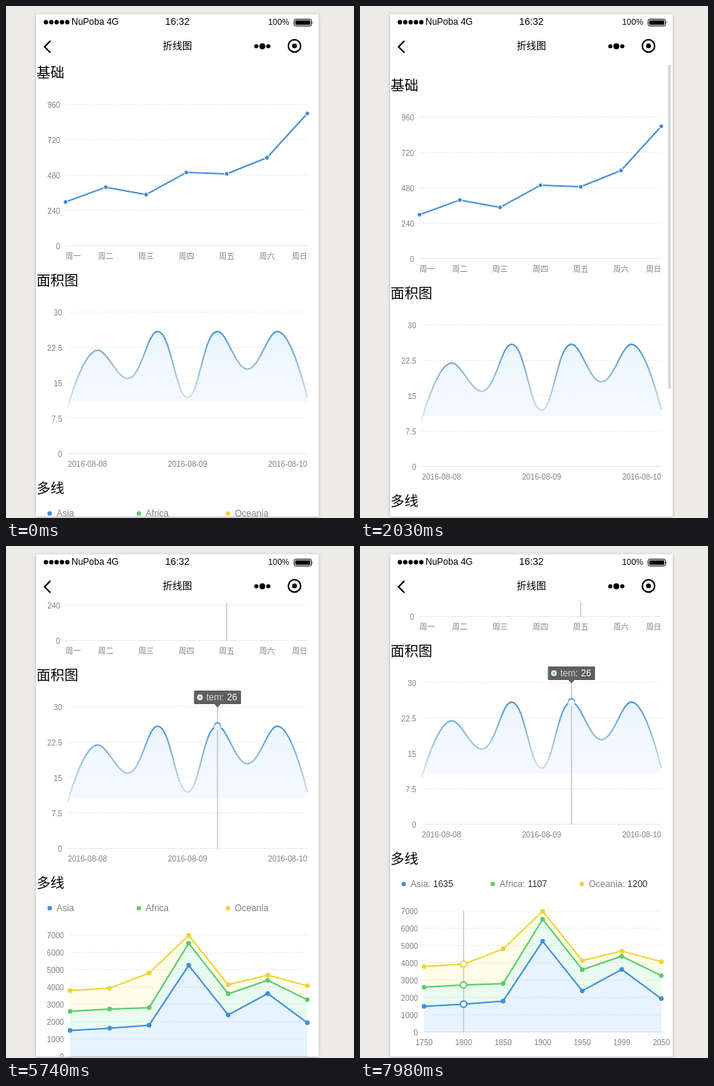
Recreate the animation shown at these times as an HTML page. Size 462 by 680 pixels, loop 8 s.

```html
<!DOCTYPE html>
<html lang="zh">
<head>
<meta charset="utf-8">
<title>折线图</title>
<style>
  html, body { margin: 0; width: 100%; height: 100%; overflow: hidden; background: #ecebe7; }
  #stage { display: block; position: absolute; left: 0; top: 0; }
  text { font-family: "Liberation Sans", "Noto Sans CJK SC", "Noto Sans CJK", "Noto Sans CJK JP", sans-serif; }
  .phone { fill: #fff; filter: drop-shadow(0 1px 2px rgba(0, 0, 0, .22)); }
  .head { font-size: 18.5px; }
  .axis { font-size: 10.2px; fill: #808080; }
  .legend { font-size: 12px; fill: #808080; }
  .legend .val { fill: #333; }
  .tip { font-size: 12px; fill: #fff; }
  .grid { stroke: #e6e6e6; stroke-dasharray: 2; }
  .base { stroke: #e8e8e8; }
  .cross { stroke: #c4c4c4; stroke-width: 1.4; }
  .line { fill: none; stroke-width: 2; stroke-linejoin: round; }
  .box { fill: #5f5f5f; }

  #page { animation: scroll 8s infinite; }
  #bar { fill: #d6d6d6; animation: barMove 8s infinite, barFade 8s linear infinite; }
  .step { opacity: 0; animation: 8s step-end infinite; }
  .thu { animation-name: thu; }
  .fri { animation-name: fri; }
  .tem { animation-name: tem; }
  .plain { animation-name: plain; }
  .pickA { animation-name: pickA; }
  .pickB { animation-name: pickB; }

  @keyframes scroll {
    0%, 10.5% { transform: translateY(0); animation-timing-function: ease-in-out; }
    14% { transform: translateY(-234px); animation-timing-function: ease-out; }
    14.875% { transform: translateY(-240px); animation-timing-function: ease-in-out; }
    20.5%, 21.2% { transform: translateY(-225px); animation-timing-function: ease-in-out; }
    24.5% { transform: translateY(13px); animation-timing-function: ease-out; }
    25.375% { transform: translateY(17px); animation-timing-function: ease-in-out; }
    31.25%, 51% { transform: translateY(0); animation-timing-function: ease-in-out; }
    60.5%, 72.2% { transform: translateY(-193px); animation-timing-function: ease-in-out; }
    76.5% { transform: translateY(-238px); animation-timing-function: ease-out; }
    81.375% { transform: translateY(-226px); }
    83.5%, 100% { transform: translateY(-225px); }
  }
  @keyframes barMove {
    0%, 10.5% { transform: translateY(0); animation-timing-function: ease-in-out; }
    13.8%, 21.2% { transform: translateY(161px); animation-timing-function: ease-in-out; }
    24.3%, 51% { transform: translateY(0); animation-timing-function: ease-in-out; }
    60.5%, 72.2% { transform: translateY(138px); animation-timing-function: ease-in-out; }
    75.5%, 100% { transform: translateY(161px); }
  }
  @keyframes barFade {
    0%, 10.5%, 31.5%, 51%, 67%, 72.2%, 82.5%, 100% { opacity: 0; }
    11.3%, 28.5%, 52%, 62%, 73%, 79.5% { opacity: 1; }
  }
  @keyframes thu { 0% { opacity: 0; } 39.375% { opacity: 1; } 51.625%, 100% { opacity: 0; } }
  @keyframes fri { 0% { opacity: 0; } 51.625%, 100% { opacity: 1; } }
  @keyframes tem { 0% { opacity: 0; } 65.625%, 100% { opacity: 1; } }
  @keyframes plain { 0% { opacity: 1; } 86.625%, 100% { opacity: 0; } }
  @keyframes pickA { 0% { opacity: 0; } 86.625% { opacity: 1; } 94.5%, 100% { opacity: 0; } }
  @keyframes pickB { 0% { opacity: 0; } 94.5%, 100% { opacity: 1; } }
</style>
</head>
<body>
<svg id="stage" width="462" height="680" viewBox="0 0 462 680">
  <defs>
    <linearGradient id="wave" gradientUnits="userSpaceOnUse" x1="0" y1="432" x2="0" y2="532">
      <stop stop-color="#4a91d0"/>
      <stop offset=".5" stop-color="#98bfe0"/>
      <stop offset="1" stop-color="#e2e6ec"/>
    </linearGradient>
    <linearGradient id="under" gradientUnits="userSpaceOnUse" x1="0" y1="432" x2="0" y2="527">
      <stop stop-color="#e7f4fe"/>
      <stop offset=".42" stop-color="#f1f8ff"/>
      <stop offset="1" stop-color="#f3f9ff"/>
    </linearGradient>
    <linearGradient id="ring" x1="0" y1="0" x2="0" y2="1">
      <stop stop-color="#3f8ccf"/>
      <stop offset=".7" stop-color="#cfe4f6"/>
      <stop offset="1" stop-color="#e8f2fb"/>
    </linearGradient>
  </defs>

  <rect class="phone" x="40" y="11" width="375" height="667"/>

  <svg x="40" y="75" width="375" height="603" viewBox="40 75 375 603">
    <g id="page"></g>
    <rect id="bar" x="409" y="78" width="3.5" height="430"/>
  </svg>

  <g id="dots"></g>
  <text x="87" y="25" font-size="12">NuPoba 4G</text>
  <text x="227.5" y="25.3" font-size="13" text-anchor="middle">16:32</text>
  <text x="348" y="25" font-size="11">100%</text>
  <rect x="382.5" y="17.5" width="23" height="9" rx="2" fill="none" stroke="#000"/>
  <rect x="384" y="19" width="20" height="6" rx=".8"/>
  <path d="M406.8 20.2q1.6 1.8 0 3.6z"/>
  <path d="M59 46.3l-7.8 7.9 7.8 7.9" fill="none" stroke="#000" stroke-width="2"/>
  <text x="227.5" y="57" font-size="13" text-anchor="middle">折线图</text>
  <circle cx="332.3" cy="53.5" r="2.8"/>
  <circle cx="340.3" cy="53.5" r="3.9"/>
  <circle cx="348.2" cy="53.5" r="2.8"/>
  <circle cx="383" cy="53" r="8.2" fill="none" stroke="#000" stroke-width="2"/>
  <circle cx="383" cy="53" r="3.2"/>
</svg>
<script>
const NS = 'http://www.w3.org/2000/svg';
const page = document.getElementById('page');

function add(parent, tag, attrs, text) {
  const el = document.createElementNS(NS, tag);
  for (const key in attrs) el.setAttribute(key, attrs[key]);
  if (text !== undefined) el.textContent = text;
  parent.appendChild(el);
  return el;
}
const label = (parent, cls, x, y, text, anchor = 'start') =>
  add(parent, 'text', { class: cls, x, y, 'text-anchor': anchor }, text);
const hline = (cls, x, y) => add(page, 'line', { class: cls, x1: x, x2: 400, y1: y, y2: y });
const vline = (parent, x, y1, y2) => add(parent, 'line', { class: 'cross', x1: x, x2: x, y1, y2 });
const ring = (parent, [cx, cy], stroke, r = 4.2) =>
  add(parent, 'circle', { cx, cy, r, fill: '#fff', stroke, 'stroke-width': 2 });
const stepGroup = name => add(page, 'g', { class: 'step ' + name });
const spread = (values, left, yOf) =>
  values.map((v, i) => [left + (400 - left) * i / (values.length - 1), yOf(v)]);
const poly = pts => 'M' + pts.map(p => p.join(' ')).join('L');

function yAxis(ticks, left, right, yOf) {
  ticks.forEach((v, i) => {
    label(page, 'axis', right, yOf(v) + 3.7, v, 'end');
    hline(i ? 'grid' : 'base', left, Math.round(yOf(v)) - .5);
  });
}

function bubble(parent, x, top, width) {
  add(parent, 'rect', { class: 'box', x: x - width / 2, y: top, width, height: 18, rx: 1 });
  add(parent, 'path', { class: 'box', d: `M${x - 4} ${top + 18}h8l-4 4.5z` });
}

// Curve with flat tangents at each inner turning point
function smooth(pts) {
  const dist = (a, b) => Math.hypot(a[0] - b[0], a[1] - b[1]);
  const handles = pts.map((p, i) => {
    const prev = pts[i - 1], next = pts[i + 1];
    if (!prev || !next) return [0, 0];
    const a = dist(prev, p), b = dist(p, next), span = .4 * (next[0] - prev[0]);
    return [span * a / (a + b), span * b / (a + b)];
  });
  return pts.slice(1).reduce((d, p, i) => {
    const q = pts[i];
    return d + `C${q[0] + handles[i][1]} ${q[1]} ${p[0] - handles[i + 1][0]} ${p[1]} ${p}`;
  }, 'M' + pts[0]);
}

function basicChart() {
  const days = ['周一', '周二', '周三', '周四', '周五', '周六', '周日'];
  const data = [300, 400, 350, 500, 490, 600, 900];
  const yOf = v => 319 - v * 188 / 960;
  const pts = spread(data, 79, yOf);
  label(page, 'head', 40.5, 95, '基础');
  yAxis([0, 240, 480, 720, 960], 79, 72, yOf);
  days.forEach((day, i) =>
    label(page, 'axis', pts[i][0], 336, day, i === 0 ? 'start' : i === 6 ? 'end' : 'middle'));
  const under = add(page, 'g', {});
  add(page, 'path', { class: 'line', d: poly(pts), stroke: '#4a90cf' });
  pts.forEach(([cx, cy]) =>
    add(page, 'circle', { cx, cy, r: 3, fill: '#3f88cc', stroke: '#fff' }));
  [['thu', 3], ['fri', 4]].forEach(([name, i]) => {
    const x = pts[i][0];
    vline(add(under, 'g', { class: 'step ' + name }), x, 127, 319);
    const g = stepGroup(name);
    ring(g, pts[i], '#3f8ccf');
    bubble(g, x, 109, 41);
    label(g, 'tip', x, 122.3, '$ ' + data[i], 'middle');
  });
}

function areaChart() {
  const yOf = v => 595 - v * 6.26;
  const pts = spread([10, 22, 16, 26, 12, 26, 18, 26, 12], 82, yOf);
  const curve = smooth(pts);
  label(page, 'head', 40.5, 371, '面积图');
  yAxis([0, 7.5, 15, 22.5, 30], 82, 74.7, yOf);
  label(page, 'axis', 82, 612, '2016-08-08');
  label(page, 'axis', 241, 612, '2016-08-09', 'middle');
  label(page, 'axis', 400, 612, '2016-08-10', 'end');
  add(page, 'path', { d: curve + 'V527H82Z', fill: 'url(#under)' });
  add(page, 'path', { class: 'line', d: curve, stroke: 'url(#wave)' });

  const g = stepGroup('tem'), x = pts[5][0];
  vline(g, x, 403, 595);
  ring(g, pts[5], 'url(#ring)');
  bubble(g, x, 385, 62.5);
  add(g, 'circle', { cx: 257.5, cy: 394, r: 3, fill: '#8fbfe8', stroke: '#fff', 'stroke-width': 1.4 });
  label(g, 'tip', 266, 398.3, 'tem:').setAttribute('fill-opacity', .75);
  label(g, 'tip', 293.5, 398.3, '26');
}

function stackChart() {
  const years = [1750, 1800, 1850, 1900, 1950, 1999, 2050];
  const series = [
    { name: 'Asia', x: 58, line: '#418fdc', fill: '#1890ff', data: [1502, 1635, 1809, 5268, 2400, 3634, 1947] },
    { name: 'Africa', x: 176.3, line: '#5bcb6c', fill: '#2fd26b', data: [1106, 1107, 1011, 1266, 1221, 767, 1333] },
    { name: 'Oceania', x: 294.7, line: '#ecd433', fill: '#fadc24', data: [1200, 1200, 2000, 460, 530, 300, 800] }
  ];
  const yOf = v => 871 - v * .023;
  label(page, 'head', 40.5, 647, '多线');
  yAxis([0, 1000, 2000, 3000, 4000, 5000, 6000, 7000], 85, 77, yOf);
  years.forEach((year, i) => label(page, 'axis', 85 + 52.5 * i, 888, year, 'middle'));

  let sums = years.map(() => 0);
  for (const s of series) {
    const floor = spread(sums, 85, yOf).reverse();
    sums = sums.map((v, i) => v + s.data[i]);
    s.pts = spread(sums, 85, yOf);
    add(page, 'path', { d: poly(s.pts.concat(floor)) + 'Z', fill: s.fill, 'fill-opacity': .1 });
  }
  const under = add(page, 'g', {});
  for (const s of series) {
    add(page, 'path', { class: 'line', d: poly(s.pts), stroke: s.line });
    s.pts.forEach(([cx, cy]) => add(page, 'circle', { cx, cy, r: 3.1, fill: s.line }));
    add(page, 'circle', { cx: s.x, cy: 674, r: 3, fill: s.line });
  }

  const plain = stepGroup('plain');
  series.forEach(s => label(plain, 'legend', s.x + 9, 678.2, s.name));
  [['pickA', 3], ['pickB', 1]].forEach(([name, i]) => {
    const g = stepGroup(name);
    vline(add(under, 'g', { class: 'step ' + name }), series[0].pts[i][0], 710, 871);
    for (const s of series) {
      ring(g, s.pts[i], s.line);
      const text = label(g, 'legend', s.x + 9, 678.2, s.name + ': ');
      add(text, 'tspan', { class: 'val' }, s.data[i]);
    }
  });
}

for (let i = 0; i < 5; i++)
  add(document.getElementById('dots'), 'circle', { cx: 53 + 7.1 * i, cy: 21.5, r: 2.9 });
basicChart();
areaChart();
stackChart();
</script>
</body>
</html>
```
